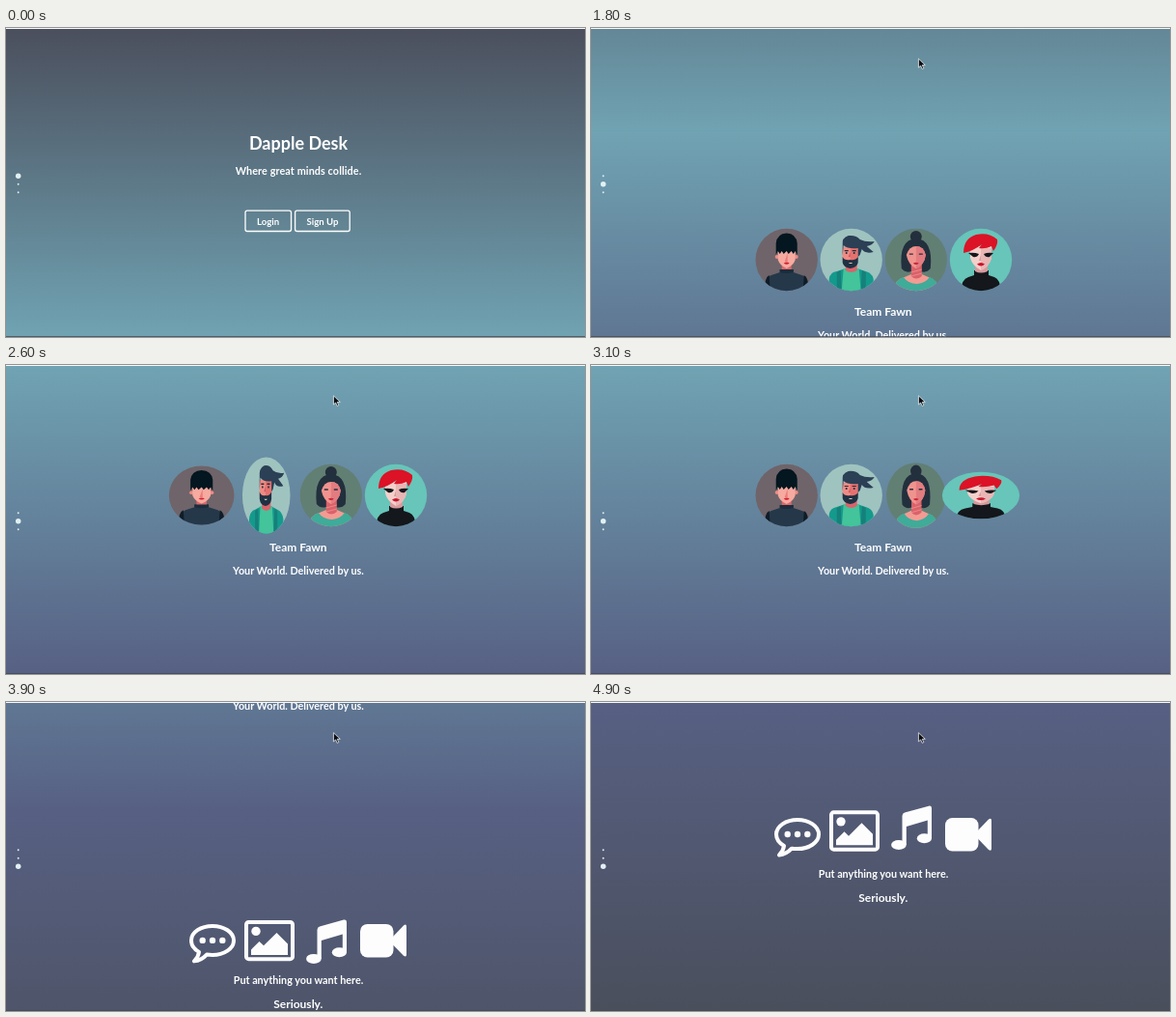
Write an HTML page that moves like this. It is 600x320 px and loops after 5000 ms.

```html
<!DOCTYPE html>
<html lang="en">
<head>
<meta charset="utf-8">
<title>Dapple Desk</title>
<style>
  html, body { margin: 0; width: 100%; height: 100%; overflow: hidden; background: #4b4f5d; }
  svg { display: block; width: 100vw; height: 100vh; }
  text { font: 700 10.8px Lato, "Open Sans", sans-serif; fill: #fff; text-anchor: middle; }
  .title { font-size: 18px; }
  .label { font-size: 12px; }
  .button { font-size: 9.6px; }
  .outline { fill: none; stroke: #fff; stroke-width: 1.3; }
  .icon { fill: #fdfdfd; }
  .line { fill: none; stroke: #fdfdfd; stroke-width: 4; stroke-linejoin: round; }
</style>
</head>
<body>
<svg viewBox="0 0 600 320" preserveAspectRatio="none">
  <defs>
    <linearGradient id="g0" x2="0" y2="1"><stop stop-color="#4b4f5d"/><stop offset="1" stop-color="#70a3b3"/></linearGradient>
    <linearGradient id="g1" x2="0" y2="1"><stop stop-color="#70a3b3"/><stop offset="1" stop-color="#576083"/></linearGradient>
    <linearGradient id="g2" x2="0" y2="1"><stop stop-color="#576083"/><stop offset="1" stop-color="#4a4f5c"/></linearGradient>
    <clipPath id="disc"><circle r="32.2"/></clipPath>
  </defs>

  <g id="pages">
    <g>
      <rect y="1" width="600" height="319.5" fill="url(#g0)"/>
      <text class="title" x="303" y="126.3">Dapple Desk</text>
      <text x="303" y="151.7" letter-spacing=".1">Where great minds collide.</text>
      <rect class="outline" x="248" y="189.2" width="47.5" height="21.3" rx="2"/>
      <rect class="outline" x="299.6" y="189.2" width="56.6" height="21.3" rx="2"/>
      <text class="button" x="271.6" y="203.7">Login</text>
      <text class="button" x="328" y="203.7">Sign Up</text>
    </g>

    <g transform="translate(0 319)">
      <rect y="1" width="600" height="319.5" fill="url(#g1)"/>
      <g class="avatar">
        <circle r="33" fill="#6f6469"/>
        <path d="M-22 33Q-22 18-16 16L-7 13V10H7V13L16 16Q22 18 22 33z" fill="#24384a"/>
        <path d="M-23 33Q-23 18-18 16L-17 33zM23 33Q23 18 18 16L17 33z" fill="#0f1c28"/>
        <path d="M-5 4H5V11H-5z" fill="#d9686c"/>
        <path d="M-7 10H7V13Q0 15-7 13z" fill="#1b2c3b"/>
        <circle cx="-10" cy="-3" r="2" fill="#ee8a86"/><circle cx="10" cy="-3" r="2" fill="#ee8a86"/>
        <path d="M-9-12H9V0Q7 6 0 9Q-7 6-9 0z" fill="#f6aaa0"/>
        <path d="M1-7V2h-3z" fill="#ea7d7b"/>
        <path d="M-3 3.500q3-2 6 0q-3 2.500-6 0z" fill="#d3202e"/>
        <path d="M-11-5V-17Q-10-27 0-27.500Q10-27 11-17V-5L9-9 7-6 5-9 2-6 0-9-3-6-5-9-7-6-9-9z" fill="#04161f"/>
      </g>
      <g class="avatar">
        <circle r="33" fill="#9fc3bf"/>
        <path d="M-23 33V20q1-7 8-8L-6 9H6l9 3q7 2 8 8V33z" fill="#149a8c"/>
        <path d="M-8 9H8L10 33H-10z" fill="#43c49a"/>
        <path d="M-15 13l4-2 1 22h-5zM15 13l-4-2-1 22h5z" fill="#16807a"/>
        <path d="M-6 2H6V11Q0 15-6 11z" fill="#d9636b"/>
        <path d="M-9-13H7V0Q5 5-1 6-8 5-9 0z" fill="#f08b84"/>
        <path d="M-1-13H7V0Q5 5-1 6z" fill="#e5726f"/>
        <path d="M-9-3Q-7 1-1 0 4 1 7-3V3Q6 8-1 9-8 8-9 3z" fill="#1f3142"/>
        <path d="M-3 3h4.500q-2 2-4.500 0z" fill="#f4d3cd"/>
        <path d="M-7-9.500h4M1-9.500h4" stroke="#1f2e3e" stroke-width="1.2"/>
        <circle cx="-5" cy="-7" r="1" fill="#1f2e3e"/><circle cx="3" cy="-7" r="1" fill="#1f2e3e"/>
        <path d="M-1-8V-3h-2z" fill="#c9585f"/>
        <path d="M-9-4V-15Q-10-23-3-25 5-26 9-21 15-18 24-19 22-15 16-14L23-8Q14-6 11-11L9-5 7-3V-12Q-4-11-8-15z" fill="#2b3f55"/>
      </g>
      <g class="avatar">
        <circle r="33" fill="#627f74"/>
        <circle cy="-24" r="6" fill="#232f3c"/>
        <path d="M-15 9Q-18-21 0-22 18-21 15 9Q11 14 5 12H-5Q-11 14-15 9z" fill="#22303d"/>
        <path d="M-24 33Q-22 20-12 18L-5 15H6L13 18Q22 20 25 33z" fill="#f39b93"/>
        <path d="M-5 4H6V17Q0 22-5 17z" fill="#d9626b"/>
        <path d="M-25 33Q-21 20-13 18Q-8 25 1 25 10 24 14 18Q22 20 25 33z" fill="#3fab99"/>
        <path d="M-10-5Q-7-14 0-14 8-14 10-5Q9 5 0 9-8 5-10-5z" fill="#f0938e"/>
        <path d="M0-14Q8-14 10-5 9 5 0 9z" fill="#e27c80"/>
        <path d="M-7-6h4M3-6h4" stroke="#26323e" stroke-width="1.3"/>
        <path d="M-3 3.500q3-1.500 6 0-3 3-6 0z" fill="#c9283a"/>
        <path d="M-5 13l11-3M-5 17l11-3" stroke="#ef8d8b" stroke-width=".9"/>
      </g>
      <g class="avatar">
        <circle r="33" fill="#67c5b9"/>
        <path d="M-21 33Q-20 20-13 18L-7 16V11H8V16l6 2Q20 20 21 33z" fill="#14171c"/>
        <path d="M-6 4H7V12Q0 15-6 12z" fill="#d79a9d"/>
        <path d="M-11-14H11V-2Q9 7 0 11-9 6-11-2z" fill="#f5d0cb"/>
        <path d="M0-12H11V-2Q9 7 0 11z" fill="#e9b6b5"/>
        <path d="M-13-7Q-7-8-2-6-4-2-8-3zM13-7Q7-8 3-6 5-2 9-3z" fill="#16171c"/>
        <path d="M-4 4.500Q0 1.500 4 4.500 0 8.500-4 4.500z" fill="#c8142a"/>
        <path d="M0-5V1h-2z" fill="#d79a9d"/>
        <path d="M-18-7Q-18-22-5-26 8-29 17-21 18-16 13-9L11-14Q5-11-2-12L1-16Q-8-9-18-7z" fill="#dc1226"/>
      </g>
      <text class="label" x="302.8" y="192.8">Team Fawn</text>
      <text x="303" y="216.700">Your World. Delivered by us.</text>
    </g>

    <g transform="translate(0 638)">
      <rect y="1" width="600" height="319.5" fill="url(#g2)"/>
      <g class="bouncer">
        <path class="line" d="M214 122c-12 0-22 6.500-22 15 0 5 3 9 8 12-.5 4-2.500 7-5 9.500 5-.5 9.500-3 13-6.800 2 .3 4 .4 6 .4 12 0 22-6.600 22-15s-10-15.100-22-15.100z"/>
        <g class="icon"><circle cx="203.700" cy="137" r="3.200"/><circle cx="214" cy="137" r="3.200"/><circle cx="224.300" cy="137" r="3.200"/></g>
      </g>
      <g class="bouncer">
        <rect class="line" x="249" y="118" width="48" height="38.300" rx="2.500"/>
        <circle class="icon" cx="259" cy="127.500" r="4.700"/>
        <path class="icon" d="M254 152v-5.500l8.500-8.500 4.500 4.300L280.500 129l11.500 11.500V152z"/>
      </g>
      <g class="bouncer icon">
        <path d="M322.500 126q0-2.600 2.500-3.400l25-6.900q3-.5 3 2.300V149h-4.200V130.500l-22 6.500V156h-4.300z"/>
        <ellipse cx="318.900" cy="156" rx="7.800" ry="5"/>
        <ellipse cx="345.400" cy="149.300" rx="7.600" ry="5"/>
      </g>
      <g class="bouncer icon">
        <rect x="367" y="120" width="34.500" height="34.500" rx="7.500"/>
        <path d="M400 134l12-12.500q3-2 3 1.200v29q0 3.200-3 1.200L400 140.500z"/>
      </g>
      <text x="303" y="181.700">Put anything you want here.</text>
      <text class="label" x="302.800" y="206.800">Seriously.</text>
    </g>
  </g>

  <g fill="#e2f0f4">
    <circle class="dot" cx="12.700" cy="153.200"/>
    <circle class="dot" cx="12.700" cy="161.700"/>
    <circle class="dot" cx="12.700" cy="170.200"/>
  </g>
  <path id="cursor" d="M0 0v9.200l2.200-2 1.500 3.400 1.700-.7-1.500-3.300h3z" fill="#0b0d10" stroke="#eef2f4" stroke-width=".8"/>
  <rect width="600" height="1" fill="#f6f8f8"/>
  <rect y="319" width="600" height="1" fill="#3f4a55" opacity=".75"/>
</svg>

<script>
const LOOP = 5000, STEP = 100, PAGE = 319;
const SCROLLS = [{ start: 1514, length: 730 }, { start: 3671, length: 600 }];
const ITEM_LENGTH = 800, ITEM_DELAY = 300;
const STRETCH_START = 2000, BOUNCE_START = 4080;
const AVATAR_X = [202.7, 269.7, 336.8, 404];

// [progress, scaleX, scaleY]
const STRETCH = [[0, 1, 1], [.3, 1.25, .75], [.4, .75, 1.25], [.5, 1.15, .85],
                 [.65, .95, 1.05], [.75, 1.05, .95], [1, 1, 1]];
// [progress, y]
const BOUNCE = [[0, 0], [.2, 0], [.4, -12.5], [.5, 0], [.6, -6.2], [.8, 0], [1, 0]];

const all = selector => [...document.querySelectorAll(selector)];
const pages = document.getElementById("pages");
const cursor = document.getElementById("cursor");
const avatars = all(".avatar"), bouncers = all(".bouncer"), dots = all(".dot");

const clamp = v => Math.min(1, Math.max(0, v));
const progress = (t, start, length) => clamp((t - start) / length);
const bezier = (u, a, b) => 3 * (1 - u) ** 2 * u * a + 3 * (1 - u) * u * u * b + u ** 3;

// CSS "ease": cubic-bezier(.25, .1, .25, 1)
function ease(x) {
  if (x <= 0 || x >= 1) return clamp(x);
  let low = 0, high = 1;
  for (let i = 0; i < 24; i++) {
    const mid = (low + high) / 2;
    if (bezier(mid, .25, .25) < x) low = mid; else high = mid;
  }
  return bezier(low, .1, 1);
}

function sample(keys, p) {
  const i = Math.max(1, keys.findIndex(key => key[0] >= p));
  const [from, to] = [keys[i - 1], keys[i]];
  const k = ease((p - from[0]) / (to[0] - from[0]));
  return from.slice(1).map((v, j) => v + (to[j + 1] - v) * k);
}

function draw(t) {
  const scroll = SCROLLS.reduce((sum, s) => sum + PAGE * ease(progress(t, s.start, s.length)), 0);
  pages.setAttribute("transform", `translate(0 ${-scroll})`);

  const [a, b] = SCROLLS.map(s => ease(progress(t, s.start, 90)));
  [1 - a, a - b, b].forEach((weight, i) => dots[i].setAttribute("r", .95 + 1.8 * weight));

  avatars.forEach((node, i) => {
    const [sx, sy] = sample(STRETCH, progress(t, STRETCH_START + i * ITEM_DELAY, ITEM_LENGTH));
    node.setAttribute("transform", `translate(${AVATAR_X[i]} 135) scale(${sx} ${sy})`);
  });
  bouncers.forEach((node, i) => {
    const [y] = sample(BOUNCE, progress(t, BOUNCE_START + i * ITEM_DELAY, ITEM_LENGTH));
    node.setAttribute("transform", `translate(0 ${y})`);
  });

  const k = ease(progress(t, 420, 580));
  cursor.setAttribute("transform", `translate(${343.4 - 4 * k} ${-12 + 43.8 * k})`);
}

avatars.forEach(node => node.setAttribute("clip-path", "url(#disc)"));

// The picture advances ten times a second.
function tick() {
  const t = (performance.now() + 8) % LOOP;
  draw(Math.floor(t / STEP) * STEP);
  requestAnimationFrame(tick);
}
tick();
</script>
</body>
</html>
```
